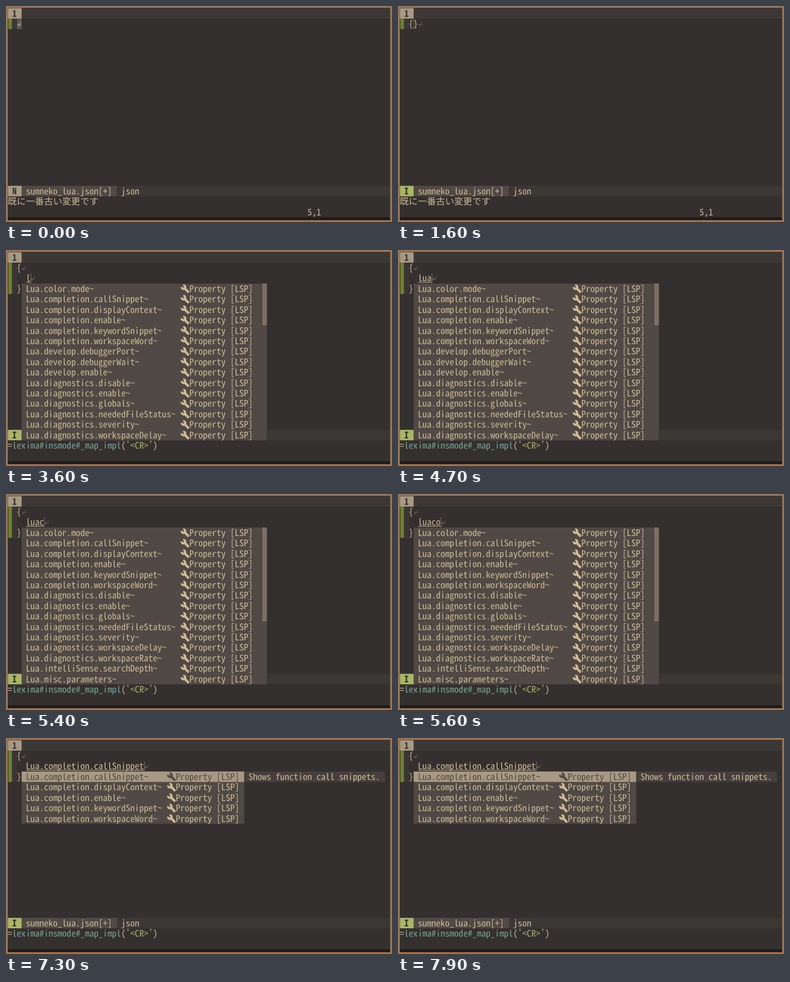
An HTML page that plays this animation: 640x360 px, repeating every 8 s.

```html
<!DOCTYPE html>
<html lang="ja">
<head>
<meta charset="utf-8">
<title>Editor completion</title>
<style>
  html, body { margin: 0; width: 100%; height: 100%; overflow: hidden; background: #a1734f; }
  svg { display: block; width: 640px; height: 360px; }
  text {
    font-family: "Noto Sans Mono CJK JP", "Noto Sans Mono", monospace;
    font-variant-ligatures: none;
    font-kerning: none;
    text-rendering: geometricPrecision;
    white-space: pre;
  }
</style>
</head>
<body>
<svg id="stage" viewBox="0 0 640 360">
  <defs>
    <path id="eol" d="M6.4 4.5V9.5H1.6M3.8 7.3L1.4 9.5L3.8 11.7" fill="none" stroke-width="1.2"/>
    <g id="wrench" fill="none">
      <path d="M4.7 2.1A3.1 3.1 0 1 1 2.1 4.7" stroke-width="3.2"/>
      <path d="M6.6 6.6L12.8 12.8" stroke-width="4" stroke-linecap="round"/>
    </g>
  </defs>
  <rect x="3" y="3" width="634" height="354" fill="#1f1c1c"/>
  <rect x="3" y="3" width="634" height="349" fill="#34302f"/>
  <g id="screen"></g>
</svg>
<script>
const LOOP = 8000, COL = 7.53, ROW = 17.42, LEFT = 3.3, TOP = 3.6, RIGHT = 637;
const FG = '#cfba94', BAR = '#3c3836', PANEL = '#504945', LIGHT = '#a89984',
      DARK = '#45403d', DIM = '#5e5650', CARET = '#766b61', GREEN = '#a9b665', AQUA = '#78a79b';

const group = (name, keys) => keys.split(' ').map(key => `Lua.${name}.${key}`);
const ITEMS = [
  ...group('color', 'mode'),
  ...group('completion', 'callSnippet displayContext enable keywordSnippet workspaceWord'),
  ...group('develop', 'debuggerPort debuggerWait enable'),
  ...group('diagnostics', 'disable enable globals neededFileStatus severity workspaceDelay workspaceRate'),
  ...group('intelliSense', 'searchDepth'),
  ...group('misc', 'parameters')
];
const THUMB_ROWS = { l: 4, luac: 9 };
const PICK = 'Lua.completion.callSnippet';

// Each step: start time and the values that change there
const STEPS = [
  [0, { mode: 'N', view: 'empty', word: '', query: '', picked: false }],
  [1100, { mode: 'I' }],
  [1600, { view: 'pair' }],
  [2300, { view: 'block' }],
  [3400, { word: 'l' }],
  [3600, { query: 'l' }],
  [3800, { word: 'lu' }],
  [4000, { word: 'lua' }],
  [5300, { word: 'luac' }],
  [5400, { query: 'luac' }],
  [5600, { word: 'luaco' }],
  [5700, { query: 'luaco' }],
  [5800, { word: 'luacom' }],
  [5900, { query: 'luacom' }],
  [6000, { word: 'luacomp' }],
  [6100, { query: 'luacomp' }],
  [6200, { word: 'luacompl' }],
  [6400, { word: 'luacomple' }],
  [7300, { word: PICK, picked: true }]
];

const x = col => LEFT + col * COL;
const y = row => TOP + row * ROW;
const escape = s => s.replace(/&/g, '&amp;').replace(/</g, '&lt;');

// Choose the size at which one character fills one column
const pen = document.createElement('canvas').getContext('2d');
pen.font = '100px "Noto Sans Mono CJK JP", "Noto Sans Mono", monospace';
const SIZE = COL * 100 / pen.measureText('M').width;

const rect = (left, top, w, h, fill) =>
  `<rect x="${left}" y="${top}" width="${w}" height="${h}" fill="${fill}"/>`;
const cells = (col, row, cols, fill, rows = 1) => rect(x(col), y(row), cols * COL, rows * ROW, fill);
const text = (col, row, s, fill = FG, weight = 400, size = SIZE) =>
  `<text x="${x(col) - 0.5}" y="${y(row) + 14}" fill="${fill}" font-size="${size}" font-weight="${weight}">${escape(s)}</text>`;
const icon = (id, col, row, stroke) =>
  `<use href="#${id}" x="${x(col) - 0.3}" y="${y(row) + 1}" stroke="${stroke}"/>`;
const eol = (col, row, stroke = DIM) => icon('eol', col, row, stroke);
const caret = (col, row) => rect(x(col) - 0.2, y(row) + 0.5, 1, ROW - 1, CARET);
const fullRow = row => rect(3, y(row), RIGHT - 3, ROW, BAR);
const badge = (row, s, fill) => cells(0, row, 3, fill) + text(1, row, s, '#32302f', 700);
const gutter = rows => cells(0, 1, 2, BAR, rows) + rect(4, y(1), 5.8, rows * ROW, '#6f8035');

function buffer({ view, word, mode }) {
  if (view === 'empty') {
    return gutter(1) + (mode === 'N'
      ? cells(2, 1, 1, '#5f5855') + eol(2, 1, '#a0968a')
      : eol(2, 1) + caret(2, 1));
  }
  if (view === 'pair') return gutter(1) + text(2, 1, '{}') + eol(4, 1) + caret(3, 1);
  const end = 4 + word.length;
  return gutter(3) + text(2, 1, '{') + eol(3, 1) +
    text(4, 2, word) + rect(x(4), y(2) + 14.8, word.length * COL, 1, FG) +
    eol(end, 2) + caret(end, 2) +
    text(2, 3, '}') + eol(3, 3);
}

function status({ mode, view }) {
  const bar = fullRow(17) + cells(3, 17, 21, PANEL) +
    text(4, 17, 'sumneko_lua.json[+]') + text(25, 17, 'json') +
    badge(17, mode, mode === 'N' ? LIGHT : GREEN);
  const message = view === 'block'
    ? text(0, 18, '=') + text(1, 18, 'lexima#insmode#_map_impl', AQUA) +
      text(25, 18, '(') + text(26, 18, "'<CR>'", GREEN) + text(32, 18, ')')
    : text(0, 18, '既に一番古い変更です', FG, 400, COL * 2) + text(66, 19, '5,1');
  return bar + message;
}

function matches(item, query) {
  const name = item.toLowerCase();
  let at = -1;
  return [...query].every(c => (at = name.indexOf(c, at + 1)) >= 0);
}

function menu({ query, picked }) {
  if (!query) return '';
  const items = ITEMS.filter(item => matches(item, query)).slice(0, 15);
  const iconCol = 6 + Math.max(...items.map(item => item.length));
  const thumb = THUMB_ROWS[query];
  const right = iconCol + 16 + (thumb ? 3 : 1);
  let out = cells(3, 3, right - 3, PANEL, items.length);
  items.forEach((item, i) => {
    const row = 3 + i, chosen = picked && i === 0, fill = chosen ? PANEL : FG;
    if (chosen) out += cells(3, row, right - 3, LIGHT);
    out += text(4, row, item + '~', fill) + icon('wrench', iconCol, row, fill) +
      text(iconCol + 2, row, 'Property [LSP]', fill);
  });
  if (thumb) out += cells(right - 1, 3, 1, '#7c6f64', thumb);
  if (picked) out += cells(right, 3, 31, DARK) + text(right + 1, 3, 'Shows function call snippets.');
  return out;
}

const screen = document.getElementById('screen');
let shown = -1;

function draw() {
  const t = performance.now() % LOOP;
  const step = STEPS.filter(([start]) => start <= t).length;
  if (step !== shown) {
    shown = step;
    const state = Object.assign({}, ...STEPS.slice(0, step).map(([, change]) => change));
    screen.innerHTML = fullRow(0) + badge(0, '1', LIGHT) + buffer(state) + status(state) + menu(state);
  }
  requestAnimationFrame(draw);
}
draw();
</script>
</body>
</html>
```
